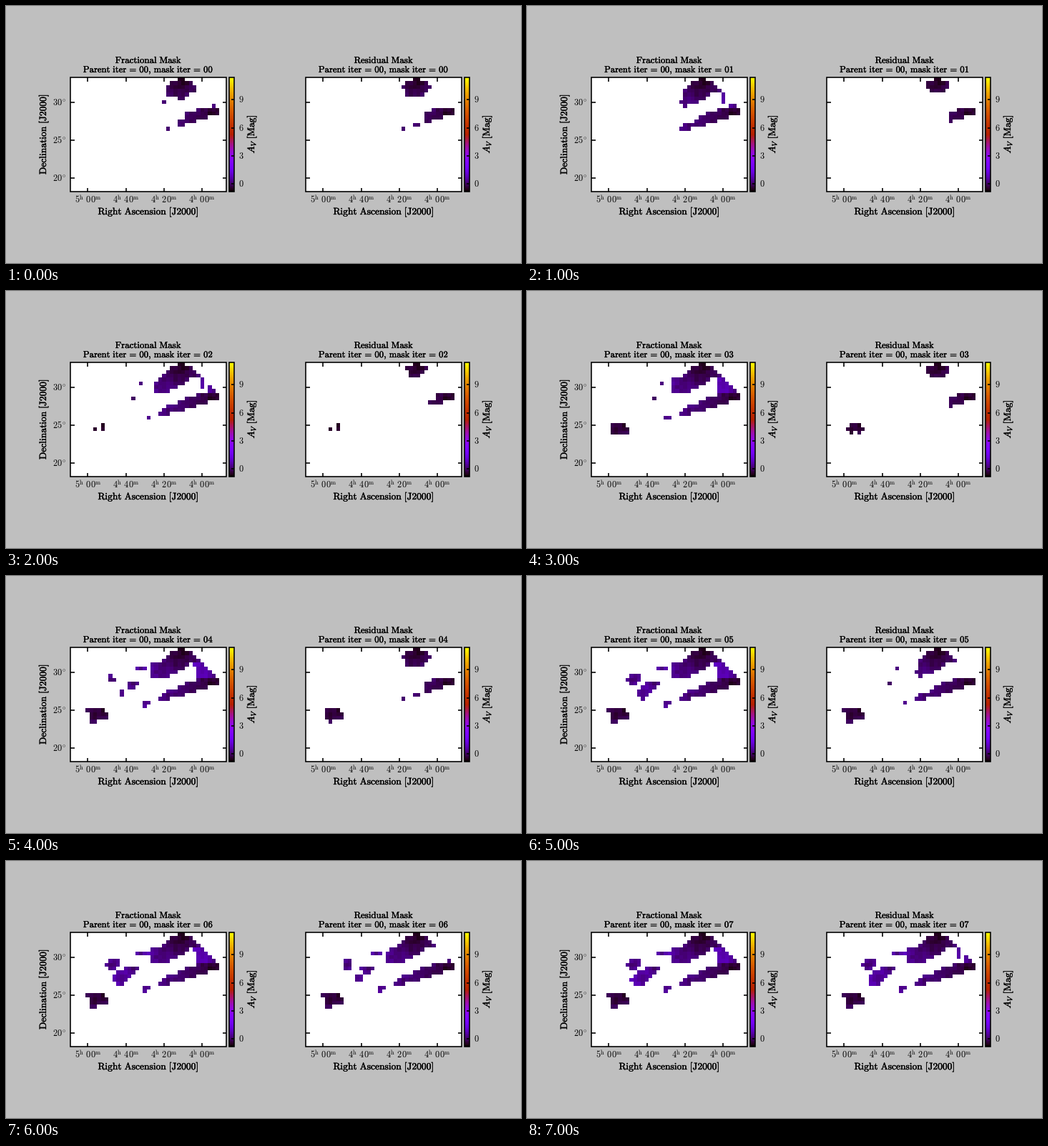
Write a matplotlib script that moves like this. It is 720 by 360 pixels and loops after 8000 ms.

```python
import numpy as np
import matplotlib.pyplot as plt
from matplotlib.animation import FuncAnimation
from matplotlib.patches import Rectangle
from matplotlib.path import Path
from matplotlib.patheffects import withStroke

plt.rcParams["mathtext.fontset"] = "cm"

W, H = 720, 360
ROWS, COLS, STEPS = 30, 41, 8
CELL = 5.33
TOP, BOTTOM, WIDTH, BAR = 100, 260, 218, 7

col, row = np.meshgrid(np.arange(COLS), np.arange(ROWS))
centres = np.column_stack([col.ravel(), row.ravel()])
rng = np.random.default_rng(4)
noise = rng.uniform(-0.012, 0.012, (ROWS, COLS))


# Time by which the residual mask has grown, for each kind of region
def rebound(step):
    return -1.5 + 0.27 * (step - 2) ** 2


def late_rebound(step):
    return rebound(step) - 3


def catch_up(step):
    return 6.3 - 1.9 * (7 - step)


def follow(step):
    return step - 0.4


class Region:
    """Cells inside an outline, reached by growth from timed seeds."""

    def __init__(self, outline, seeds, slowness, tone, residual_time):
        inside = Path(outline).contains_points(centres).reshape(ROWS, COLS)
        reach = [t + slowness * np.hypot(col - x, row - y) for x, y, t in seeds]
        self.birth = np.where(inside, np.min(reach, axis=0), np.inf)
        self.level = tone + 0.013 * (self.birth - self.birth.min()) + noise
        self.residual_time = residual_time

    def shown(self, residual, step):
        return self.birth <= (self.residual_time(step) if residual else step)


regions = [
    # northern cloud
    Region([(28.3, -0.4), (28.7, -0.4), (31.4, 0.6), (33.6, 3.4), (30.5, 3.6),
            (30.4, 4.4), (29, 5.4), (25.2, 7.4), (20.6, 7.4), (20.6, 3.6),
            (23.5, 3.4), (25.4, 0.6)],
           [(28.5, 0.5, -3.7), (26.8, 2.8, -1.75), (24, 6, 0)],
           0.8, 0.025, rebound),
    # long arm
    Region([(38.4, 7.6), (38.4, 9.2), (35.1, 10.2), (31.8, 11.4), (28, 12.4),
            (24, 13.4), (22.6, 13.4), (25, 10.7), (28.4, 9.6), (33.5, 7.6)],
           [(36.5, 8.7, -3.8), (32.5, 9.9, -2.3), (28.5, 11.8, -0.9),
            (24.8, 13, -0.6)],
           0.8, 0.03, rebound),
    # link between cloud and arm
    Region([(31.6, 3.6), (34.5, 3.6), (37.5, 7.4), (32.8, 7.4)],
           [(34, 4, 1), (34, 5, 1), (34, 6, 1), (37, 7, -0.3)],
           1.3, 0.09, late_rebound),
    # spur west of the cloud
    Region([(16.6, 4.6), (20.6, 4.6), (20.6, 5.4), (16.6, 5.4)],
           [(18, 5, 2)], 1.8, 0.085, catch_up),
    # western diagonal
    Region([(13.6, 8.6), (17.4, 8.6), (17.4, 9.2), (12.6, 13.4), (10.6, 13.4),
            (9.6, 11.8)],
           [(16, 9, 2), (13.3, 11.5, 3.2)], 1.1, 0.075, catch_up),
    # western clump
    Region([(9.6, 6.6), (12.4, 6.6), (12.4, 8.4), (10.6, 9.4), (9.6, 9.4),
            (8.6, 8.3)],
           [(10.4, 7.9, 2.6)], 1.3, 0.08, catch_up),
    # southern block
    Region([(3.6, 15.6), (8.4, 15.6), (9.6, 17), (9.6, 18.4), (7, 18.4),
            (6.4, 19.4), (4.6, 19.4), (4.6, 16.4), (3.6, 16.4)],
           [(8, 16.5, 1.1), (6, 17, 1.5)], 1, 0.03, follow),
    # small speck
    Region([(18.6, 13.6), (20.4, 13.6), (19.4, 15.4), (18.6, 15.4)],
           [(20, 14, 2)], 1, 0.09, catch_up),
]


def mask(residual, step):
    grid = np.full((ROWS, COLS), np.nan)
    for region in regions:
        on = region.shown(residual, step)
        grid[on] = np.clip(region.level[on], 0.015, 0.15)
    return grid


def rm(text):
    for old, new in ((" = ", r"\,=\,"), (", ", r",\,"), (" ", r"\ ")):
        text = text.replace(old, new)
    return r"$\mathrm{" + text + "}$"


fig = plt.figure(figsize=(W / 72, H / 72), dpi=72, facecolor="#bfbfbf")
ax = fig.add_axes([0, 0, 1, 1])
ax.axis("off")
HEAVY = [withStroke(linewidth=0.35, foreground="black")]


def label(x, y, text, size=12.3, ha="center"):
    return ax.text(x, y, text, size=size, ha=ha, va="baseline")


def heading(x, y, text, size=13.5, va="baseline", angle=0):
    return ax.text(x, y, text, size=size, ha="center", va=va, rotation=angle,
                   path_effects=HEAVY)


def line(x0, y0, x1, y1):
    ax.plot([x0, x1], [y0, y1], color="black", lw=1.6,
            solid_capstyle="butt", zorder=4)


def box(x, width, **style):
    ax.add_patch(Rectangle((x, TOP), width, BOTTOM - TOP, **style))


def panel(x, name, show_dec):
    box(x, WIDTH, fc="white", ec="none", zorder=0)
    left, top = x + 0.1, TOP - 0.3
    image = ax.imshow(
        np.full((ROWS, COLS), np.nan), cmap="gnuplot", vmin=0, vmax=1,
        aspect="auto", interpolation="nearest", zorder=1,
        extent=(left, left + COLS * CELL, top + ROWS * CELL, top))
    box(x, WIDTH, fc="none", ec="black", lw=1.6, zorder=5)

    for i, time in enumerate(("5 00", "4 40", "4 20", "4 00")):
        tx = x + 24.4 + 53.2 * i
        line(tx, BOTTOM, tx, BOTTOM - 5.5)
        line(tx, TOP, tx, TOP + 5.5)
        hour, minute = time.split()
        label(tx, 276, rf"${hour}^{{\mathrm{{h}}}}\ {minute}^{{\mathrm{{m}}}}$")
    for i, dec in enumerate((30, 25, 20)):
        ty = 135 + 53.2 * i
        line(x, ty, x + 5.5, ty)
        line(x + WIDTH, ty, x + WIDTH - 5.5, ty)
        if show_dec:
            label(x - 6.5, ty + 4, rf"${dec}^{{\!\circ}}$", ha="right")
    heading(x + 109, 292, rm("Right Ascension [J2000]"))
    if show_dec:
        heading(x - 37, 179.5, rm("Declination [J2000]"), va="center", angle=90)

    bar = x + 222
    ax.imshow(np.linspace(1, 0, 256)[:, None], cmap="gnuplot", aspect="auto",
              extent=(bar, bar + BAR, BOTTOM, TOP), zorder=1)
    box(bar, BAR, fc="none", ec="black", lw=1.6, zorder=5)
    for value in (0, 3, 6, 9):
        ty = 249.3 - 13.1 * value
        line(bar + BAR, ty, bar + BAR - 4, ty)
        label(bar + 13, ty + 4, f"${value}$", ha="left")
    heading(bar + 32, 179.5, r"$A_V\ \mathrm{[Mag]}$", va="center", angle=90)

    heading(x + 109.5, 80, rm(name), 12.9)
    return image, heading(x + 109, 93, "", 12.7)


panels = [panel(90, "Fractional Mask", True),
          panel(419, "Residual Mask", False)]
ax.set(xlim=(0, W), ylim=(H, 0))


def update(step):
    for residual, (image, title) in enumerate(panels):
        image.set_data(mask(residual, step))
        title.set_text(rm(f"Parent iter = 00, mask iter = {step:02d}"))
    return [artist for pair in panels for artist in pair]


anim = FuncAnimation(fig, update, frames=STEPS, interval=1000, repeat=True,
                     repeat_delay=0, blit=False)
plt.show()
```
